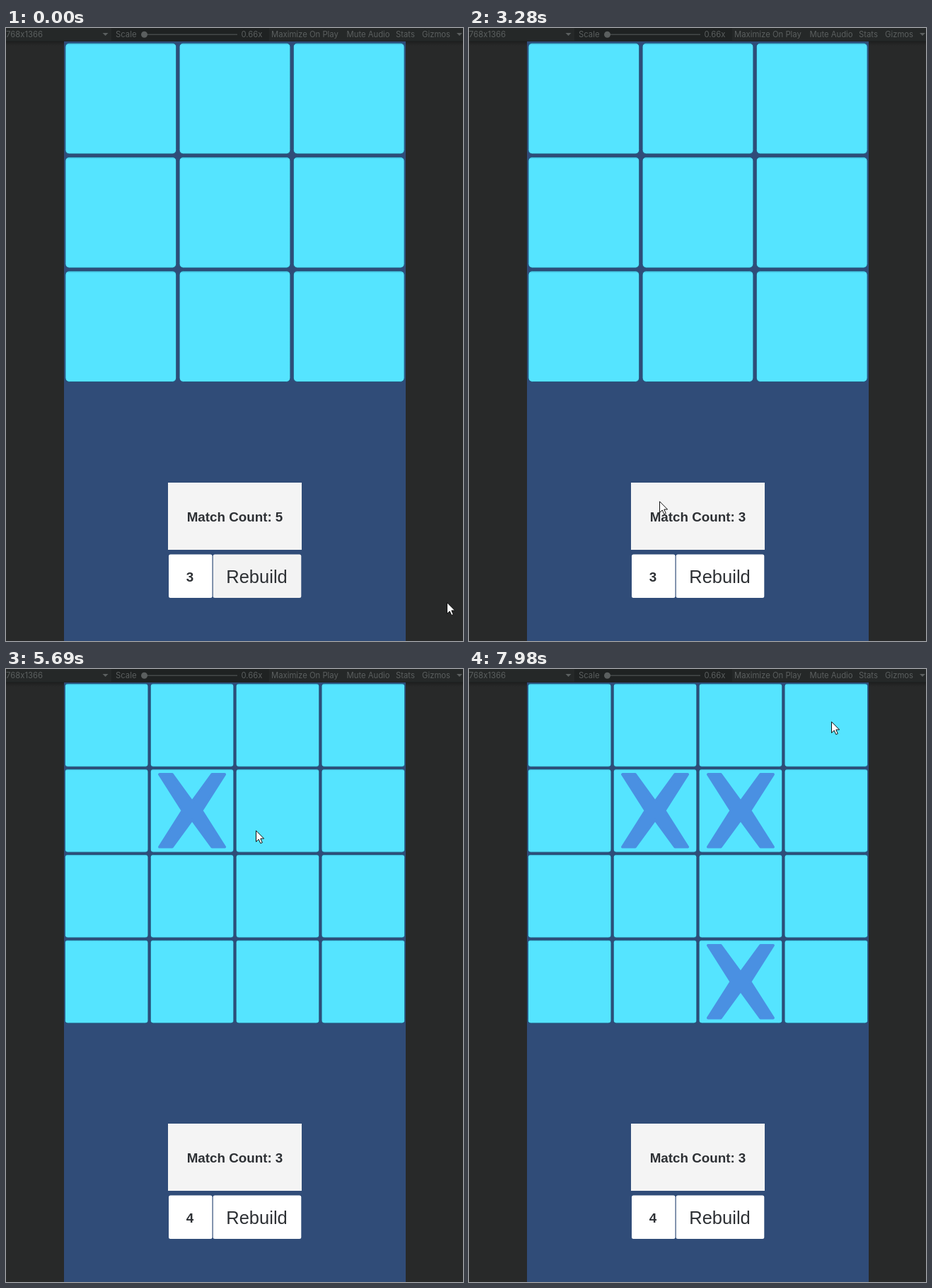
Animation, 646 px wide and 867 px high, one loop 8000 ms. Source, as an HTML page:

```html
<!DOCTYPE html>
<html lang="en">
<head>
<meta charset="utf-8">
<title>Match board</title>
<style>
  html, body { margin: 0; width: 100%; height: 100%; overflow: hidden; background: #282929; }
  svg { display: block; }
  .bar { font: 11.3px Inter, Roboto, sans-serif; fill: #5b5f5f; }
  .ui { font-family: "Liberation Sans", Arial, sans-serif; fill: #2d3034; text-anchor: middle; }
  .bold { font-weight: bold; font-size: 18.8px; }
  .cell { fill: url(#face); stroke: #22567d; }
  .mark { fill: #4a90e2; stroke: #4a90e2; stroke-width: 5; stroke-linejoin: round; }
</style>
</head>
<body>
<svg width="646" height="867" viewBox="0 0 646 867">
  <defs>
    <linearGradient id="face" x1="0" y1="0" x2="0" y2="1">
      <stop offset="0" stop-color="#3fb2d0"/>
      <stop offset=".02" stop-color="#55e4ff"/>
    </linearGradient>
    <linearGradient id="shade" x1="0" y1="0" x2="0" y2="1">
      <stop offset="0" stop-color="#000" stop-opacity=".3"/>
      <stop offset="1" stop-color="#000" stop-opacity="0"/>
    </linearGradient>
    <path id="x" d="M-61.5-68.5H-37.5L0-17 37.5-68.5H61.5L18 0 61.5 68.5H37.5L0 17-37.5 68.5H-61.5L-18 0Z"/>
  </defs>

  <rect width="646" height="867" fill="#282929"/>
  <rect x="82" y="19" width="483" height="848" fill="#304c78"/>
  <rect y="18" width="82" height="7" fill="url(#shade)"/>
  <rect x="565" y="18" width="81" height="7" fill="url(#shade)"/>

  <g class="bar">
    <rect width="646" height="19" fill="#1f2222"/>
    <rect width="149" height="18" fill="#252828"/>
    <rect x="372" width="274" height="18" fill="#252828"/>
    <text x="0" y="13">768x1366</text>
    <path d="M136.5 7h8l-4 4zM637 7h8l-4 4z"/>
    <text x="155" y="13">Scale</text>
    <rect x="195" y="8.5" width="132" height="1.5" fill="#454949"/>
    <circle cx="195.5" cy="9.3" r="4.5"/>
    <text x="332.5" y="13">0.66x</text>
    <text x="375" y="13">Maximize On Play</text>
    <text x="481.5" y="13">Mute Audio</text>
    <text x="551" y="13">Stats</text>
    <text x="588" y="13">Gizmos</text>
  </g>

  <g id="boards"></g>

  <g class="ui">
    <rect x="229" y="643" width="189" height="95" fill="#f4f4f4"/>
    <text id="count" class="bold" x="323.5" y="697.7"></text>
    <rect x="230" y="744.5" width="61.5" height="61.5" rx="2.5" fill="#fff"/>
    <text id="size" class="bold" x="260" y="783"></text>
    <rect id="button" x="292.7" y="744.5" width="124.6" height="61.5" rx="2.5"/>
    <text x="354.5" y="785" font-size="25.5">Rebuild</text>
  </g>

  <g id="cursor">
    <path d="M.5.7V16.3L4.2 12.9 6.8 18.6 9.3 17.5 6.8 11.9H11.6Z" fill="#fff" stroke="#111"/>
    <circle id="press" r="11.5" fill="#ff0" fill-opacity=".5"/>
  </g>
</svg>
<script>
const LOOP = 8000;
const PRESS = 140, DELAY = 70;
const TYPED = 4130;
const WIDTH = 483.6, LEFT = 81.7, TOP = 19;

// where the pointer rests: arrival, departure, place, time of a click there
const STOPS = [
  { at: 0, until: 70, x: 623, y: 812 },
  { at: 620, until: 820, x: 467, y: 115 },
  { at: 1030, until: 1100, x: 287, y: 359 },
  { at: 1310, until: 1710, x: 292, y: 256, click: 1570 },
  { at: 2020, until: 2200, x: 204, y: 252, click: 2050 },
  { at: 2360, until: 2560, x: 363, y: 73 },
  { at: 2700, until: 2930, x: 339, y: 100, click: 2830 },
  { at: 3700, until: 4200, x: 255, y: 778, click: 3780 },
  { at: 4560, until: 4980, x: 403, y: 785, click: 4610 },
  { at: 5350, until: 5560, x: 280, y: 186, click: 5420 },
  { at: 5830, until: 6230, x: 364, y: 235, click: 5880 },
  { at: 6490, until: 6720, x: 402, y: 428, click: 6560 },
  { at: 7080, until: 7150, x: 503, y: 88 },
  { at: 7500, until: 7520, x: 406, y: 72 },
  { at: 7980, until: LOOP, x: 512, y: 74 }
];
const CLICKS = STOPS.filter(s => s.click);

const $ = id => document.getElementById(id);
const show = (el, on) => { el.style.display = on ? '' : 'none'; };
const easeOut = k => 1 - (1 - k) ** 3;

function add(parent, tag, attrs) {
  const el = document.createElementNS('http://www.w3.org/2000/svg', tag);
  for (const k in attrs) el.setAttribute(k, attrs[k]);
  return parent.appendChild(el);
}

function buildBoard(n) {
  const g = add($('boards'), 'g', {});
  const pitch = WIDTH / n, gap = pitch * 0.0135, side = pitch - 2 * gap;
  const marks = [];
  for (let k = 0; k < n * n; k++) {
    const x = LEFT + (k % n) * pitch, y = TOP + Math.floor(k / n) * pitch;
    add(g, 'rect', { class: 'cell', x: x + gap, y: y + gap, width: side, height: side, rx: pitch * 0.034 });
    marks.push(add(g, 'use', {
      href: '#x', class: 'mark',
      transform: `translate(${x + pitch / 2} ${y + pitch / 2}) scale(${3 * pitch / WIDTH})`
    }));
  }
  return { n, g, marks };
}

function pointerAt(t) {
  const i = STOPS.findLastIndex(s => s.at <= t);
  const from = STOPS[i], to = STOPS[i + 1];
  if (t <= from.until) return from;
  const k = easeOut((t - from.until) / (to.at - from.until));
  return { x: from.x + (to.x - from.x) * k, y: from.y + (to.y - from.y) * k };
}

const onButton = p => p.x > 293 && p.x < 417 && p.y > 745 && p.y < 806;

// marked cells joined side by side with the given one
function groupOf(cell, marked, n, group = new Set()) {
  if (!marked.has(cell) || group.has(cell)) return group;
  group.add(cell);
  if (cell % n) groupOf(cell - 1, marked, n, group);
  if ((cell + 1) % n) groupOf(cell + 1, marked, n, group);
  groupOf(cell - n, marked, n, group);
  groupOf(cell + n, marked, n, group);
  return group;
}

// replays every click made so far
function stateAt(t) {
  const size = t < TYPED ? 3 : 4;
  const state = { n: 3, size, count: 5, selected: true, marked: new Set() };
  for (const c of CLICKS) {
    if (c.click + DELAY > t) break;
    state.selected = onButton(c);
    if (state.selected) {
      state.n = size;
      state.marked.clear();
    } else if (c.y < TOP + WIDTH) {
      const pitch = WIDTH / state.n;
      const cell = Math.floor((c.x - LEFT) / pitch) + state.n * Math.floor((c.y - TOP) / pitch);
      state.marked.add(cell);
      const group = groupOf(cell, state.marked, state.n);
      if (group.size >= 3) {
        group.forEach(k => state.marked.delete(k));
        state.count = group.size;
      }
    }
  }
  return state;
}

const boards = [3, 4].map(buildBoard);

function draw(t) {
  const s = stateAt(t), p = pointerAt(t);
  for (const { n, g, marks } of boards) {
    show(g, n === s.n);
    marks.forEach((m, k) => show(m, s.marked.has(k)));
  }
  $('count').textContent = 'Match Count: ' + s.count;
  $('size').textContent = s.size;
  $('button').setAttribute('fill', s.selected || onButton(p) ? '#f3f3f3' : '#fff');
  $('cursor').setAttribute('transform', `translate(${Math.round(p.x)} ${Math.round(p.y)})`);
  show($('press'), CLICKS.some(c => t >= c.click && t < c.click + PRESS));
}

const start = performance.now();
function tick() {
  draw((performance.now() - start) % LOOP);
  requestAnimationFrame(tick);
}
tick();
</script>
</body>
</html>
```
